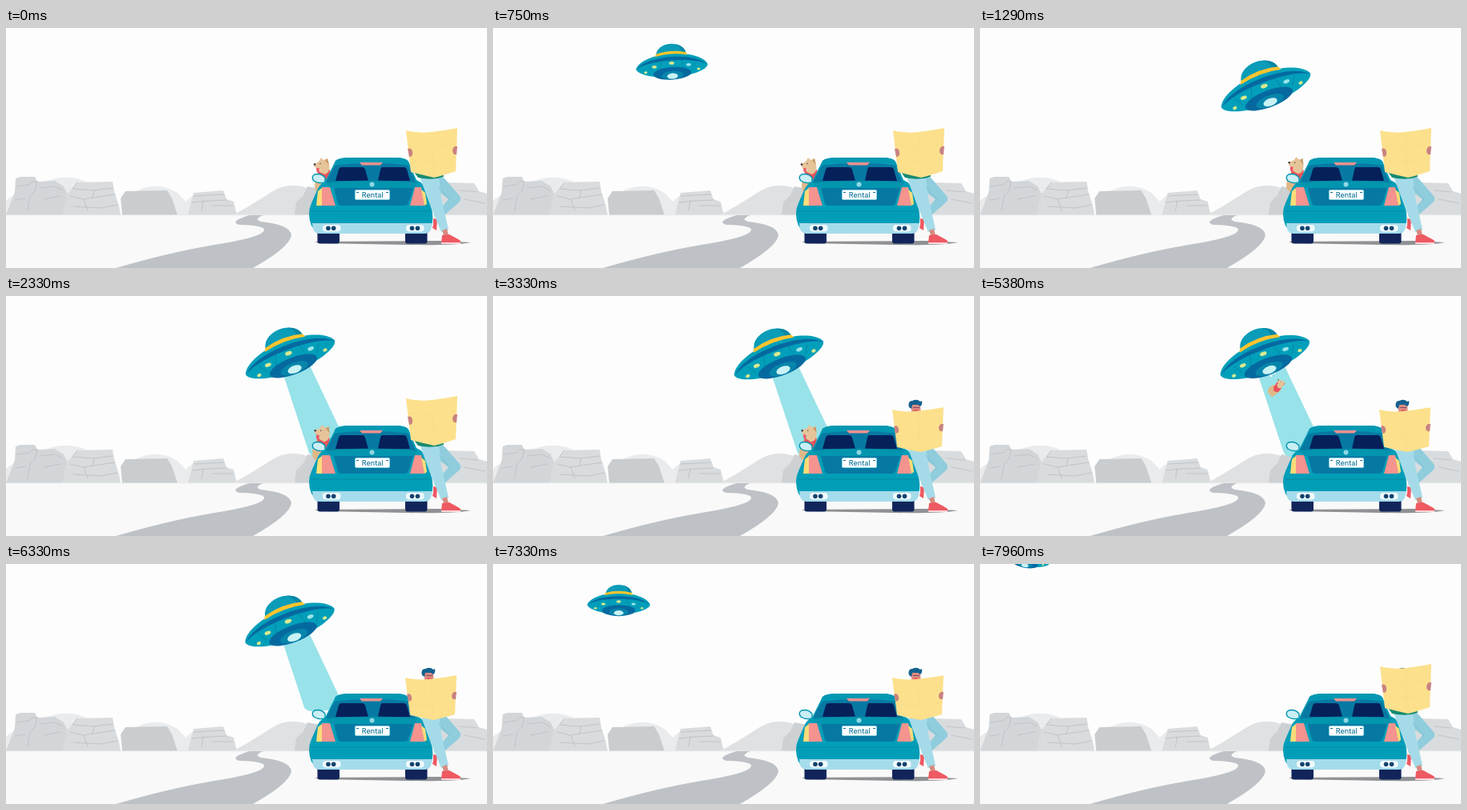
Animation of 600 by 300 pixels, one loop 8000 ms. Source, as an HTML page:

```html
<!DOCTYPE html>
<html lang="en">
<head>
<meta charset="utf-8">
<title>Road trip visitor</title>
<style>
  html, body { margin: 0; width: 100%; height: 100%; overflow: hidden; background: #fdfdfd; }
  svg { display: block; width: 100vw; height: 100vh; }
  .line { fill: none; stroke: #b9bec2; stroke-width: .8; stroke-linecap: round; stroke-linejoin: round; }
  .seam { fill: none; stroke: #0786a2; stroke-width: .9; }
  .plate { font: 500 9px Inter, Lato, sans-serif; fill: #17789c; text-anchor: middle; }
</style>
</head>
<body>
<svg viewBox="0 0 600 300">
  <rect width="600" height="300" fill="#fdfdfd"/>

  <g id="mountains">
    <g fill="#e9ebec">
      <path d="M0 234V216Q8 208 15 209L40 196Q75 178 106 195L140 234Z"/>
      <path d="M145 234L160 205Q188 190 214 206L240 234Z"/>
      <path d="M212 234Q222 214 240 206L262 234Z"/>
    </g>
    <path d="M0 234L3 226 11 205 12 188 18 186H36L39 192 61 191 72 198 80 215 88 234Z" fill="#d3d6d9"/>
    <path d="M70 234L76 208 89 193 133 192 135 204 141 223 143 234Z" fill="#d9dcde"/>
    <path d="M145 234L143 213 149 204 201 203 207 213 214 234Z" fill="#c9cdd0"/>
    <path d="M227 234L234 206 271 203 275 214 284 217 288 234Z" fill="#d9dcde"/>
    <path d="M283 234Q305 222 325 209Q343 196 357 197Q371 196 383 204L410 234Z" fill="#dfe1e3"/>
    <path d="M360 234L362 218 371 209 376 198 410 204V234Z" fill="#cdd1d4"/>
    <path d="M535 234L545 193 584 194 590 204 600 207V234Z" fill="#d9dcde"/>
    <g class="line">
      <path d="M13 198L29 196 33 192H39M39 192L36 204 30 210 27 228M43 200L61 198 71 203M12 215L24 213M47 214L68 210"/>
      <path d="M89 193L83 201 108 203 133 200M80 210L96 214 136 208M97 214L102 228M84 223L118 225 139 221M110 203L108 212"/>
      <path d="M235 210L272 208M232 218L252 216 275 215M246 216L244 228M258 222H283"/>
      <path d="M566 203L588 205M572 214L597 219"/>
    </g>
  </g>

  <rect y="234" width="600" height="66" fill="#f9f9f9"/>
  <path d="M0 234H600" stroke="#eff0f0"/>
  <path d="M304 234H321Q308 239 318 242Q355 246 356 259Q354 274 308 300H137Q205 280 260 271Q330 260 321 250Q312 246 291 246Q277 242 304 234Z" fill="#bec2c6"/>

  <path id="beam" fill="#98e2e9"/>

  <g id="dog">
    <path d="M390 180Q383 190 386 203L391 207H406L407 181Z" fill="#dfb888"/>
    <path d="M389 179L404 177 406 190 398 195 390 189Z" fill="#e7535b"/>
    <path id="tongue" d="M387 175L392 174 390 181Q387 182 387 175Z" fill="#ee5a63"/>
    <path d="M384 170L390 167 393 162 396 165 401 163 403 171Q405 180 398 183L391 180 392 176 385 174Z" fill="#e6c499"/>
    <path d="M398 166L401 163 403 171Z" fill="#c99a6a"/>
    <circle cx="385" cy="170.5" r="1.3" fill="#3b3440"/>
    <circle cx="392" cy="169.5" r=".7" fill="#3b3440"/>
  </g>

  <g id="bone" fill="#fff">
    <path d="M-5 -1.4A2.4 2.4 0 1 0 -7 0A2.4 2.4 0 1 0 -5 1.4H5A2.4 2.4 0 1 0 7 0A2.4 2.4 0 1 0 5 -1.4Z"/>
  </g>

  <g id="ufo">
    <path d="M-25 -14C-25 -40 25 -40 25 -14Z" fill="#0a9cb8"/>
    <path d="M9 -32C23 -28 25 -20 25 -14H17C19 -22 16 -28 9 -32Z" fill="#0786a5"/>
    <path d="M-59.5 4C-55 -7 -36 -13 -26 -15Q0 -19 26 -15C36 -13 55 -7 59.5 4C59 13 32 22 0 22S-59 13 -59.5 4Z" fill="#029fba"/>
    <path d="M-59 5C-40 -17.5 40 -17.5 59 5C40 -10 -40 -10 -59 5Z" fill="#0569a0"/>
    <path d="M-16 -6L-20 8M16 -6L20 8M-40 0L-33 11M40 0L33 11" class="seam"/>
    <path d="M-25 -18Q0 -25 25 -18L27 -13.5Q0 -20 -27 -13.5Z" fill="#fcc42f"/>
    <ellipse cy="15.5" rx="31.5" ry="10.5" fill="#0569a0"/>
    <ellipse cy="18.5" rx="18" ry="7" fill="#0785ab"/>
    <ellipse cy="20" rx="9" ry="4.7" fill="#c9f2f5"/>
    <g fill="#d9e98f">
      <ellipse cx="-29" cy="3" rx="4" ry="2.3"/>
      <ellipse cy="-1.5" rx="4.4" ry="2.5"/>
      <ellipse cx="28" cy="3" rx="4" ry="2.3" fill="#9be4e8"/>
      <ellipse cx="44" cy="11" rx="2.7" ry="2"/>
      <ellipse cx="-44" cy="11" rx="2.7" ry="2"/>
    </g>
  </g>

  <path d="M385 267L540 266 580 268Q560 272 500 271L390 269Z" fill="#8f9194"/>

  <g id="car">
    <rect x="388.5" y="250" width="27.5" height="19.5" rx="3" fill="#12255a"/>
    <rect x="498" y="250" width="27.5" height="19.5" rx="3" fill="#12255a"/>
    <path d="M398 193Q390 195 384 191Q380 186 385 183Q393 181 398 187Z" fill="#c9eef4" stroke="#0295b0" stroke-width="1.4"/>
    <path d="M411 166Q415 162 430 162H485Q499 162 502 167L512 190Q523 194 525 209L530 222Q534 236 531 247L526 256H388L381 247Q375 232 381 219L388 203Q391 195 398 192Z" fill="#029eb8"/>
    <path d="M407 177L413 168H499L503 174 511 193H399Z" fill="#0679a2"/>
    <path d="M411 166Q415 162 430 162H485Q499 162 502 167L504 172Q457 165 409 172Z" fill="#0298b2"/>
    <path d="M441 168H470L467 171.5H444Z" fill="#f4918f"/>
    <path d="M419 174H444Q447 174 448 177L452 191H411L415 177Q416 174 419 174ZM469 174H496Q499 174 500 177L504 191H464L467 177Q468 174 469 174Z" fill="#06205a"/>
    <path d="M399 193Q457 189 513 193L511 200H404Z" fill="#0295b0"/>
    <path d="M409 200H508L502 219Q501 222 497 222H419Q415 222 414 219Z" fill="#0679a2"/>
    <path d="M399 193Q457 189 513 193M380 229H531" class="seam"/>
    <path d="M394 199H404L411 222H393Z" fill="#f5938f"/>
    <path d="M389 204L394 200V222H387Z" fill="#fbdc78"/>
    <path d="M510 199H518L522 222H504Z" fill="#f5938f"/>
    <path d="M518 202L523 206 525 220 522 222Z" fill="#fbdc78"/>
    <circle cx="456.5" cy="195.5" r="3" fill="#8fd7e4"/>
    <rect x="435.5" y="202.5" width="43" height="12" rx="1.5" fill="#fff" stroke="#8ed4e2"/>
    <path d="M437 205.5H440M474 205.5H477" stroke="#176b94"/>
    <text x="457.3" y="212" class="plate">Rental</text>
    <path d="M382 244H532L530 252Q528 257 522 257H391Q385 257 383 251Z" fill="#a5dceb"/>
    <rect x="395" y="246" width="22.5" height="8.5" rx="4" fill="#f0fafc"/>
    <rect x="499" y="246" width="22.5" height="8.5" rx="4" fill="#f0fafc"/>
    <g fill="#12426f">
      <circle cx="402" cy="250.3" r="2.8"/><circle cx="408.7" cy="250.3" r="2.8"/>
      <circle cx="506.5" cy="250.3" r="2.8"/><circle cx="513.5" cy="250.3" r="2.8"/>
    </g>
  </g>

  <g id="man">
    <path d="M533 238L538 239 537 253 532 250 533 246Z" fill="#ee5962"/>
    <path d="M528 187H546L566 210Q569 215 564 219L541 239 534 235 552 214 536 202Z" fill="#8fcddd"/>
    <path d="M516 186H540L543 212 552 252 543 255 530 224Z" fill="#a5dbe8"/>
    <path d="M540 199L554 215" stroke="#74b9cd" fill="none" stroke-width=".8"/>
    <path d="M544 253L550 251 552 259H546Z" fill="#d88b80"/>
    <path d="M544 259L553 258 564 264Q568 266 567 268H543Z" fill="#ee5962"/>
    <path d="M543 268H567V270H543Z" fill="#fbd5d6"/>
    <path d="M506 176H544L546 186Q532 191 514 187Z" fill="#178a70"/>
    <g id="head">
      <path d="M521 136H533L534 151H523Z" fill="#dc8b82"/>
      <path d="M519 139Q517 131 523 131Q529 128 533 132L535 131Q536 136 533 138L530 136H523L522 141Z" fill="#14618f"/>
      <path d="M524 139.5H532" stroke="#7a4b5c"/>
      <path d="M525 143Q528 141 531 143V148H525Z" fill="#e65a62"/>
    </g>
    <g id="map">
      <path d="M499 128Q514 132 531 130T563 125L561 179Q546 184 534 187Q520 184 505 180Z" fill="#fce08c"/>
      <path d="M531 130L534 187M501 146Q530 152 562 144M503 164Q530 170 561 162" fill="none" stroke="#f8da84" stroke-width=".6"/>
      <path d="M501 151Q506 149 507 155Q508 161 503 161ZM563 148Q558 147 557 153Q557 159 562 158Z" fill="#c98280"/>
    </g>
  </g>
</svg>

<script>
const LOOP = 8000;
const $ = id => document.getElementById(id);
const clamp = v => Math.min(1, Math.max(0, v));
const mix = (a, b, k) => a + (b - a) * k;
const mixPoint = (p, q, k) => [mix(p[0], q[0], k), mix(p[1], q[1], k)];

// Eased 0 to 1 between two times
const ramp = (t, from, to) => {
  const k = clamp((t - from) / (to - from));
  return k * k * (3 - 2 * k);
};

// Smooth curve through [time, ...values] keys, flat at turning points
function follow(keys, t) {
  const last = keys.length - 1;
  if (t <= keys[0][0]) return keys[0].slice(1);
  if (t >= keys[last][0]) return keys[last].slice(1);
  const i = keys.findIndex(key => key[0] > t) - 1;
  const [a, b] = [keys[i], keys[i + 1]];
  const span = b[0] - a[0], k = (t - a[0]) / span;
  const rate = (n, j) => (keys[n + 1][j] - keys[n][j]) / (keys[n + 1][0] - keys[n][0]);
  const slope = (n, j) => {
    if (n === 0) return rate(0, j);
    if (n === last) return rate(last - 1, j);
    const before = rate(n - 1, j), after = rate(n, j);
    return before * after <= 0 ? 0 : 2 * before * after / (before + after);
  };
  return a.slice(1).map((v, n) => {
    const j = n + 1, k2 = k * k, k3 = k2 * k;
    return mix(v, b[j], 3 * k2 - 2 * k3)
      + span * (slope(i, j) * (k3 - 2 * k2 + k) + slope(i + 1, j) * (k3 - k2));
  });
}

// time, x, y, angle, scale
const flight = [
  [0, 46, -40, 10, .5], [80, 60, -18, 10, .5], [450, 142, 34, 2, .64],
  [920, 268, 51, -8, .82], [1290, 355, 74, -21, 1], [6330, 354.5, 74, -21, 1],
  [6710, 302, 54, -10, .86], [7330, 157, 48, 0, .66],
  [7540, 117, 37, 4, .62], [7960, 58, -8, 10, .5], [8000, 53, -13, 10, .5]
];

function placeUfo(t) {
  let [x, y, angle, scale] = follow(flight, t);
  const hover = ramp(t, 1250, 1700) * (1 - ramp(t, 6330, 6600));
  const wave = Math.cos((t - 2330) / 800 * 2 * Math.PI);
  x -= 2 * wave * hover;
  y -= wave * hover;
  $('ufo').setAttribute('transform', `translate(${x} ${y}) rotate(${angle}) scale(${scale})`);
  return [x, y];
}

function placeBeam(t, x, y) {
  const reach = ramp(t, 1680, 2080) * (1 - ramp(t, 6250, 6560));
  const left = [x - 6.5, y + 27], right = [x + 26, y + 14];
  const endRight = mixPoint(right, [x + 78, 197], reach);
  const endLeft = mixPoint(left, [x + 29, 208], reach);
  const bend = mixPoint(endLeft, left, .12);
  $('beam').setAttribute('d', `M${left}L${right}L${endRight}Q${endLeft} ${bend}Z`);
  $('beam').style.display = reach > 0 ? '' : 'none';
}

function placeDog(t) {
  const look = ramp(t, 800, 1250), turn = ramp(t, 3300, 3900);
  const lift = ramp(t, 4600, 5750);
  const x = mix(394 + 6 * turn, 365, lift);
  const y = mix(175 - look - 7 * turn, 92, lift);
  const angle = 8 * look + 32 * turn + 20 * Math.sin(lift * 9);
  $('dog').setAttribute('transform',
    `translate(${x} ${y}) rotate(${angle}) scale(${1 - .6 * lift}) translate(-394 -175)`);
  $('tongue').setAttribute('transform', `translate(0 ${.7 * Math.sin(t / 60) - .4})`);
  $('dog').style.display = lift < 1 ? '' : 'none';
}

function placeBone(t) {
  const [x, y, angle, scale] = follow([
    [3400, 362, 94, -80, .4], [4250, 389.5, 154, 22, .75],
    [4450, 389.5, 154, 28, .75], [5450, 363, 93, 150, .4]
  ], t);
  $('bone').setAttribute('transform', `translate(${x} ${y}) rotate(${angle}) scale(${scale})`);
  $('bone').style.display = t > 3400 && t < 5450 ? '' : 'none';
}

function placeMan(t) {
  const lower = ramp(t, 2440, 2900) * (1 - ramp(t, 7580, 7900));
  const nod = Math.sin(t / 130) * (ramp(t, 3500, 3700) - ramp(t, 4700, 4950));
  const peek = ramp(t, 2440, 2800);
  // The map tips back a little as it comes down
  $('map').setAttribute('transform',
    `translate(${-lower} ${128 + 14 * lower}) scale(1 ${1 - .1 * lower}) translate(0 -128)`);
  $('head').setAttribute('transform', `translate(${.5 * nod} ${2 * (1 - peek)})`);
}

function draw(now) {
  const t = now % LOOP;
  placeBeam(t, ...placeUfo(t));
  placeDog(t);
  placeBone(t);
  placeMan(t);
}

const start = performance.now();
function tick() {
  draw(performance.now() - start);
  requestAnimationFrame(tick);
}
tick();
</script>
</body>
</html>
```
